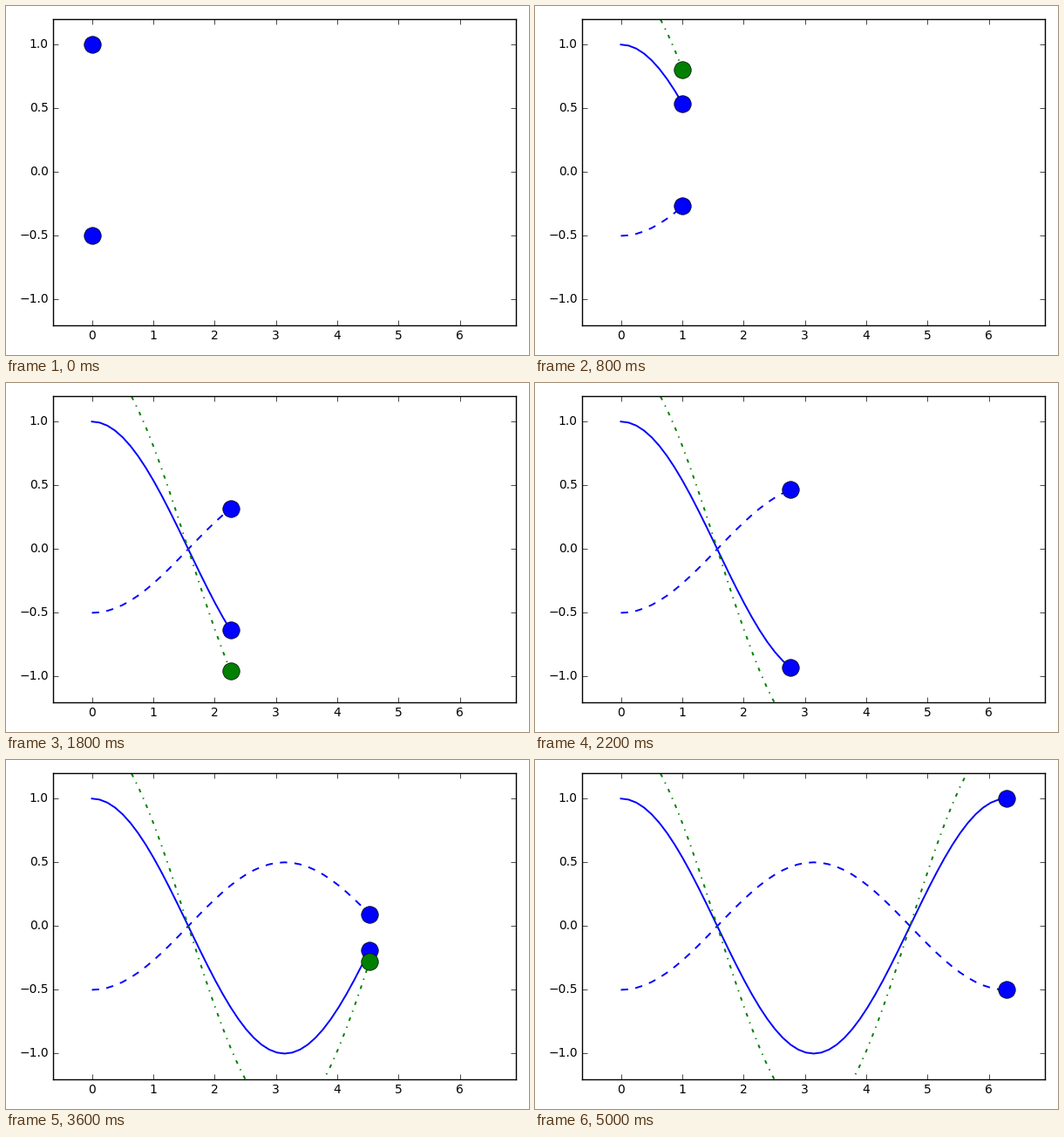
These frames come from a looping animation (600 px wide and 400 px high, 5.1 s). A matplotlib script:

```python
import numpy as np
import matplotlib.pyplot as plt
from matplotlib.animation import FuncAnimation

WIDTH, HEIGHT, DPI = 600, 400, 100
FRAMES, INTERVAL = 51, 100

plt.style.use("classic")
plt.rcParams.update({
    "figure.dpi": DPI,
    "savefig.dpi": DPI,
    "font.family": "DejaVu Sans",
    "font.size": 10,
})

fig = plt.figure(figsize=(WIDTH / DPI, HEIGHT / DPI), dpi=DPI, facecolor="white")
left, bottom, right, top = 54.3, 34.3, 585, 385
ax = fig.add_axes([left / WIDTH, bottom / HEIGHT,
                   (right - left) / WIDTH, (top - bottom) / HEIGHT])
ax.set_xlim(-0.2 * np.pi, 2.2 * np.pi)
ax.set_ylim(-1.2, 1.2)
ax.set_xticks(range(7))
ax.set_yticks(np.linspace(-1, 1, 5))
ax.tick_params(labelsize=10)

x = np.linspace(0, 2 * np.pi, FRAMES)


def add_curve(amplitude, color, style):
    """Create a trail and the ball at its head."""
    trail, = ax.plot([], [], color=color, linestyle=style, linewidth=1.4)
    ball, = ax.plot([], [], "o", color=color, markersize=14,
                    markeredgecolor="k", markeredgewidth=0.5)
    return amplitude * np.cos(x), trail, ball


curves = [
    add_curve(1.0, "b", "-"),
    add_curve(-0.5, "b", "--"),
    add_curve(1.5, "g", "-."),
]


def update(i):
    artists = []
    for y, trail, ball in curves:
        trail.set_data(x[:i + 1], y[:i + 1])
        ball.set_data([x[i]], [y[i]])
        artists += [trail, ball]
    return artists


anim = FuncAnimation(fig, update, frames=FRAMES, interval=INTERVAL,
                     init_func=lambda: update(0), repeat=True, repeat_delay=0)
plt.show()
```
